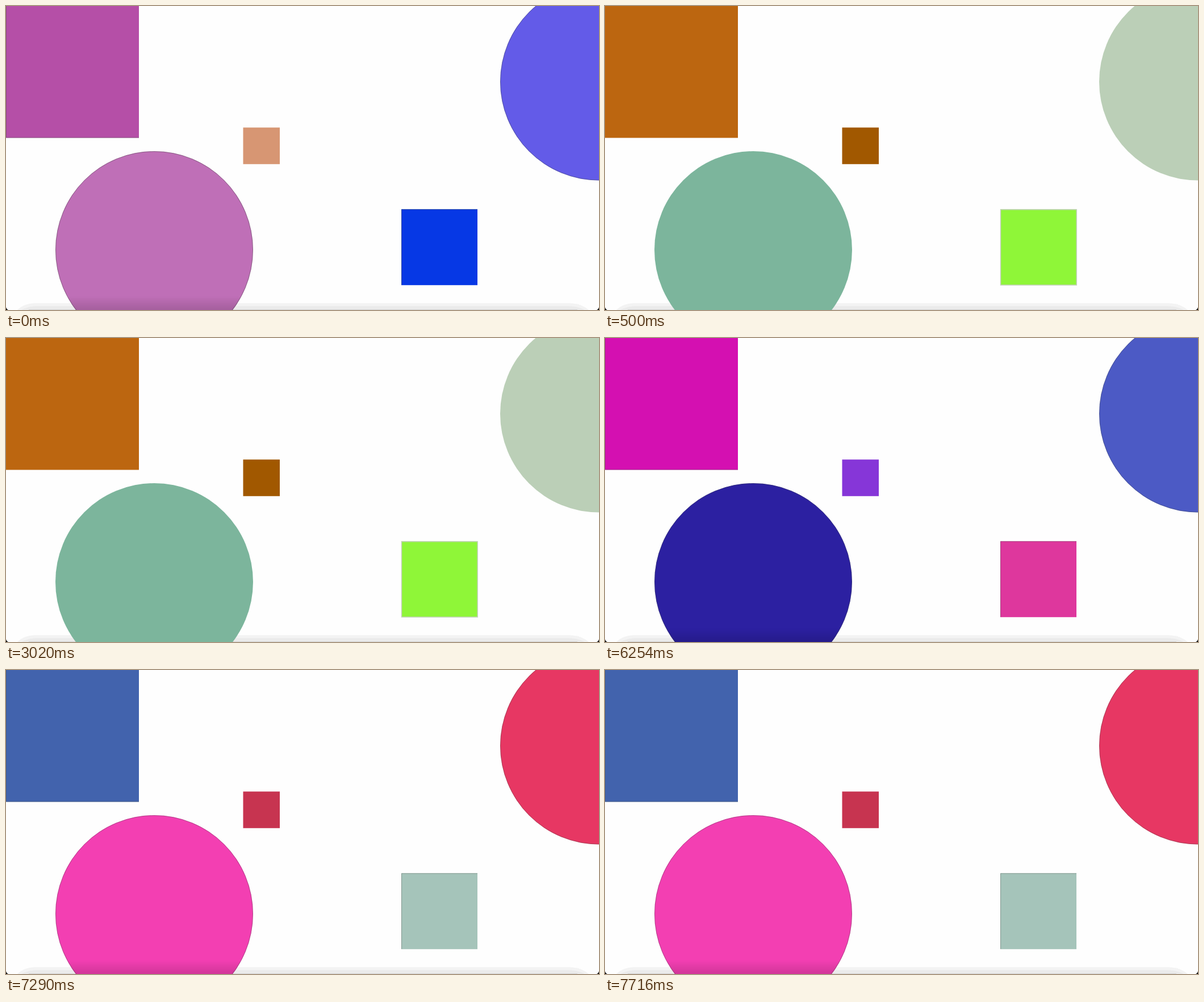
Animation of 1044 by 536 pixels, one loop 8000 ms. Source, as an HTML page:

```html
<!DOCTYPE html>
<html lang="en">
<head>
<meta charset="utf-8">
<title>Colour shapes</title>
<style>
  html, body { margin: 0; width: 100%; height: 100%; overflow: hidden; background: #fefefe; }
  svg { display: block; width: 1044px; height: 536px; }

  .shape { animation: recolour 8s step-end infinite; }
  .edge { fill: none; stroke: #3c463c; animation: outline 8s step-end infinite; }
  .shade { animation: shade 8s step-end infinite; }

  #corner { --a: #b54fa7; --b: #bc6610; --c: #d410b1; --d: #4263ad; }
  #moon   { --a: #635be8; --b: #bbcfb7; --c: #4c5ac5; --d: #e73763; }
  #small  { --a: #d79673; --b: #a15800; --c: #8636d8; --d: #c73450; }
  #large  { --a: #bf6fb7; --b: #7cb59c; --c: #2c20a1; --d: #f33fb2; }
  #medium { --a: #0638e5; --b: #8ff638; --c: #de379d; --d: #a5c4ba; }

  @keyframes recolour {
    0% { fill: var(--a); }
    6.25% { fill: var(--b); }
    58.75% { fill: var(--c); }
    91.125%, 100% { fill: var(--d); }
  }
  @keyframes outline {
    0% { stroke-opacity: .4; }
    6.25% { stroke-opacity: 0; }
    58.75%, 100% { stroke-opacity: .35; }
  }
  @keyframes shade {
    0% { opacity: 1; }
    6.25% { opacity: 0; }
    58.75%, 100% { opacity: 1; }
  }
  .rim { fill: none; stroke: #c4cfbd; stroke-width: 1.5; animation: rim 8s step-end infinite; }
  @keyframes rim {
    0% { opacity: 0; }
    6.25% { opacity: 1; }
    58.75%, 100% { opacity: 0; }
  }
</style>
</head>
<body>
<svg viewBox="0 0 1044 536">
  <defs>
    <linearGradient id="fade" x2="0" y2="1">
      <stop stop-opacity="0"/>
      <stop offset="1" stop-opacity=".14"/>
    </linearGradient>
    <clipPath id="disc"><circle cx="261" cy="430" r="174"/></clipPath>
  </defs>

  <path fill="#f3f3f3" d="M20 536Q32 524 52 524H992Q1012 524 1026 536Z"/>
  <path fill="#ebebeb" d="M27 536Q39 529 56 529H988Q1006 529 1019 536Z"/>
  <path fill="#d2d2d2" d="M40 535H1006V536H40Z"/>

  <rect id="corner" class="shape" width="234" height="232.5"/>
  <path class="edge" d="M.5 0V232H234"/>
  <circle id="moon" class="shape" cx="1044" cy="133.5" r="174"/>
  <circle class="edge" cx="1044" cy="133.5" r="173.5"/>
  <rect id="small" class="shape" x="417.5" y="214.3" width="64.5" height="64.5"/>
  <circle id="large" class="shape" cx="261" cy="430" r="174"/>
  <circle class="edge" cx="261" cy="430" r="173.5"/>
  <rect class="shade" x="87" y="512" width="348" height="24" fill="url(#fade)" clip-path="url(#disc)"/>
  <rect id="medium" class="shape" x="696" y="358.3" width="134" height="133.9"/>
  <path class="edge" d="M696.5 492V358.8H830"/>
  <rect class="rim" x="696.5" y="359" width="133.7" height="133"/>

  <path d="M0 531Q1 535 4 536H0ZM1044 531Q1043 535 1040 536H1044Z"/>
</svg>
</body>
</html>
```
